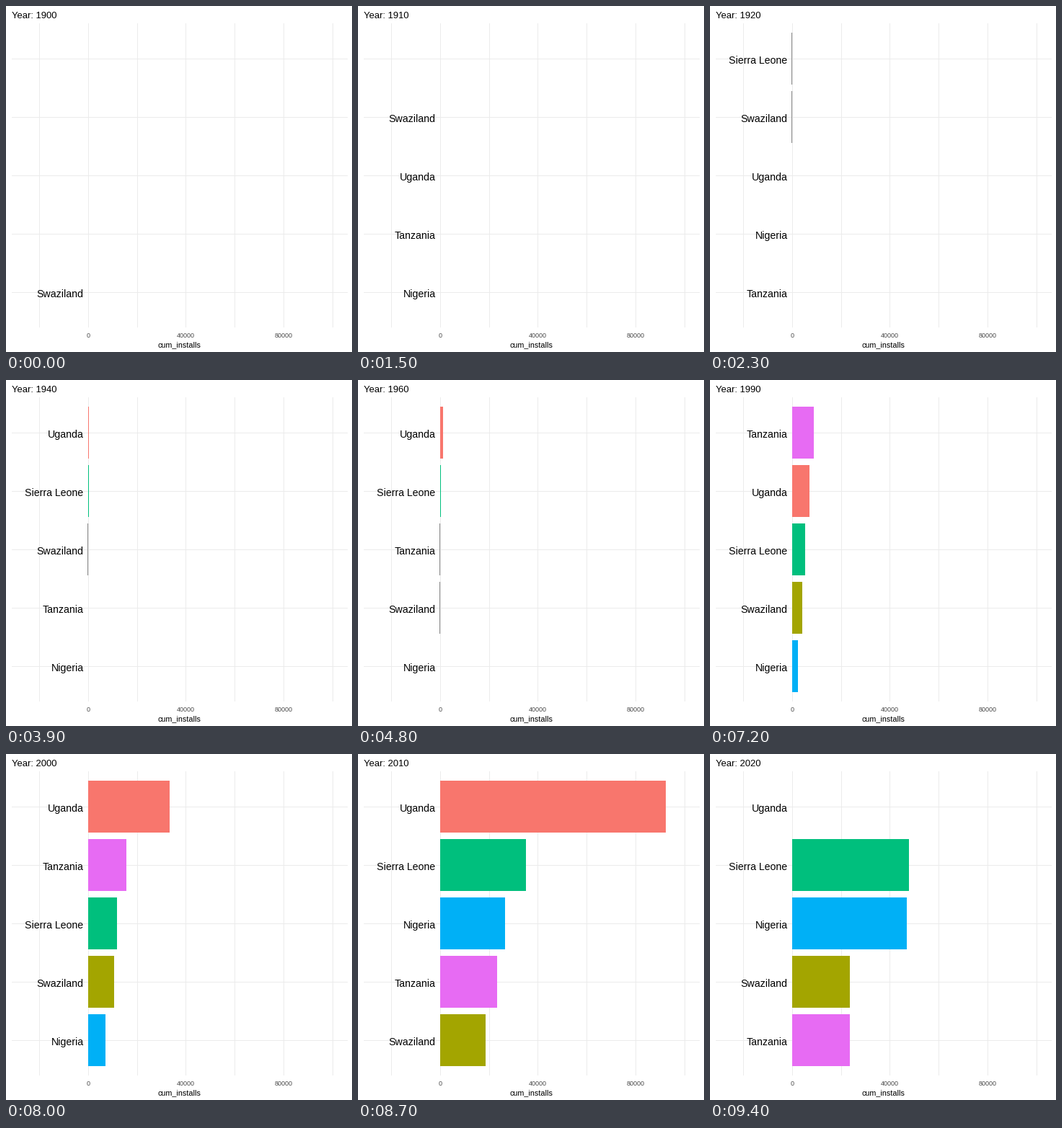
A matplotlib script that plays this animation: 480x480 px, repeating every 10000 ms.

```python
import matplotlib.pyplot as plt
from matplotlib.animation import FuncAnimation
from matplotlib.patches import Rectangle

SIZE = 480
FRAMES, INTERVAL = 100, 100
ZERO, UNIT = 113.8, 135.6 / 40000
ROW_TOP, ROW_STEP, BAR_H = 37, 81, 72
LIMIT = 100000

COLORS = {
    "Uganda": "#F8766D",
    "Swaziland": "#A3A500",
    "Sierra Leone": "#00BF7D",
    "Nigeria": "#00B0F6",
    "Tanzania": "#E76BF3",
}
NAMES = {name[:2]: name for name in COLORS}

# Ranking per decade from 1900, always filling the rows from the bottom up.
STATES = [
    ("Sw", [0]),
    ("Sw Ug Ni Ta", [0, 0, 0, 0]),
    ("Sw Ug Ta Ni", [0, 0, 0, 0]),
    ("Si Sw Ug Ni Ta", [60, 40, 0, 0, 0]),
    ("Sw Si Ug Ni Ta", [300, 120, 40, 0, 0]),
    ("Ug Si Sw Ta Ni", [400, 300, 60, 0, 0]),
    ("Ug Si Ta Sw Ni", [1270, 400, 80, 60, 0]),
    ("Ug Ta Si Ni Sw", [2400, 1600, 1000, 380, 330]),
    ("Ta Ug Si Sw Ni", [4800, 3300, 1850, 1270, 680]),
    ("Ta Ug Si Sw Ni", [8950, 7200, 5400, 4200, 2450]),
    ("Ug Ta Si Sw Ni", [33446, 15735, 11897, 10716, 7173]),
    ("Ug Si Ni Ta Sw", [92490, 35217, 26656, 23410, 18690]),
    ("Ug Si Ni Sw Ta", [120000, 47911, 47025, 23700, 23690]),
]
# Frames at which the bars switch; the title follows one frame later.
SWITCHES = [7, 15, 23, 31, 39, 47, 55, 63, 71, 79, 86, 93]

plt.rcParams["font.family"] = "Liberation Sans"
fig = plt.figure(figsize=(4.8, 4.8), dpi=100, facecolor="white")
ax = fig.add_axes([0, 0, 1, 1])
ax.set_xlim(0, SIZE)
ax.set_ylim(SIZE, 0)
ax.axis("off")


def box(x, y, w, h, color, z=1):
    return ax.add_patch(Rectangle((x, y), w, h, facecolor=color, linewidth=0,
                                  antialiased=False, zorder=z))


def label(x, y, text, px, color="black", ha="left"):
    return ax.text(x, y, text, fontsize=px * 0.72, color=color, ha=ha,
                   va="baseline", zorder=3)


for row in range(5):
    box(8, 73 + ROW_STEP * row, 466, 1, "#EBEBEB")
for k in range(-1, 6):
    box(round(ZERO + 20000 * k * UNIT), 24, 1, 422, "#EBEBEB")
for value in (0, 40000, 80000):
    label(ZERO + value * UNIT, 460, str(value), 9, "#4D4D4D", "center")
label(240.7, 473, "cum_installs", 10.8, ha="center")

title = label(8, 17, "", 13)
bars = [box(114, ROW_TOP + ROW_STEP * r, 0, BAR_H, "white", 2) for r in range(5)]
names = [label(107.5, 80 + ROW_STEP * r, "", 14.1, ha="right") for r in range(5)]


def set_bar(bar, value, color):
    bar.set_visible(0 < value <= LIMIT)
    edge = round(ZERO + value * UNIT)
    if edge <= 114:
        # Bars thinner than a pixel show as a grey hairline.
        bar.set(x=113, width=1, facecolor="#888888")
    else:
        bar.set(x=114, width=edge - 114, facecolor=color)


def draw(frame):
    state = sum(s <= frame for s in SWITCHES)
    decade = sum(s < frame for s in SWITCHES)
    title.set_text(f"Year: {1900 + 10 * decade}")
    keys, values = STATES[state]
    keys = keys.split()
    empty = 5 - len(keys)
    for row, (bar, text) in enumerate(zip(bars, names)):
        if row < empty:
            bar.set_visible(False)
            text.set_text("")
            continue
        name = NAMES[keys[row - empty]]
        text.set_text(name)
        set_bar(bar, values[row - empty], COLORS[name])
    return [title, *bars, *names]


anim = FuncAnimation(fig, draw, frames=FRAMES, interval=INTERVAL,
                     repeat=True, repeat_delay=0, blit=False)
plt.show()
```
